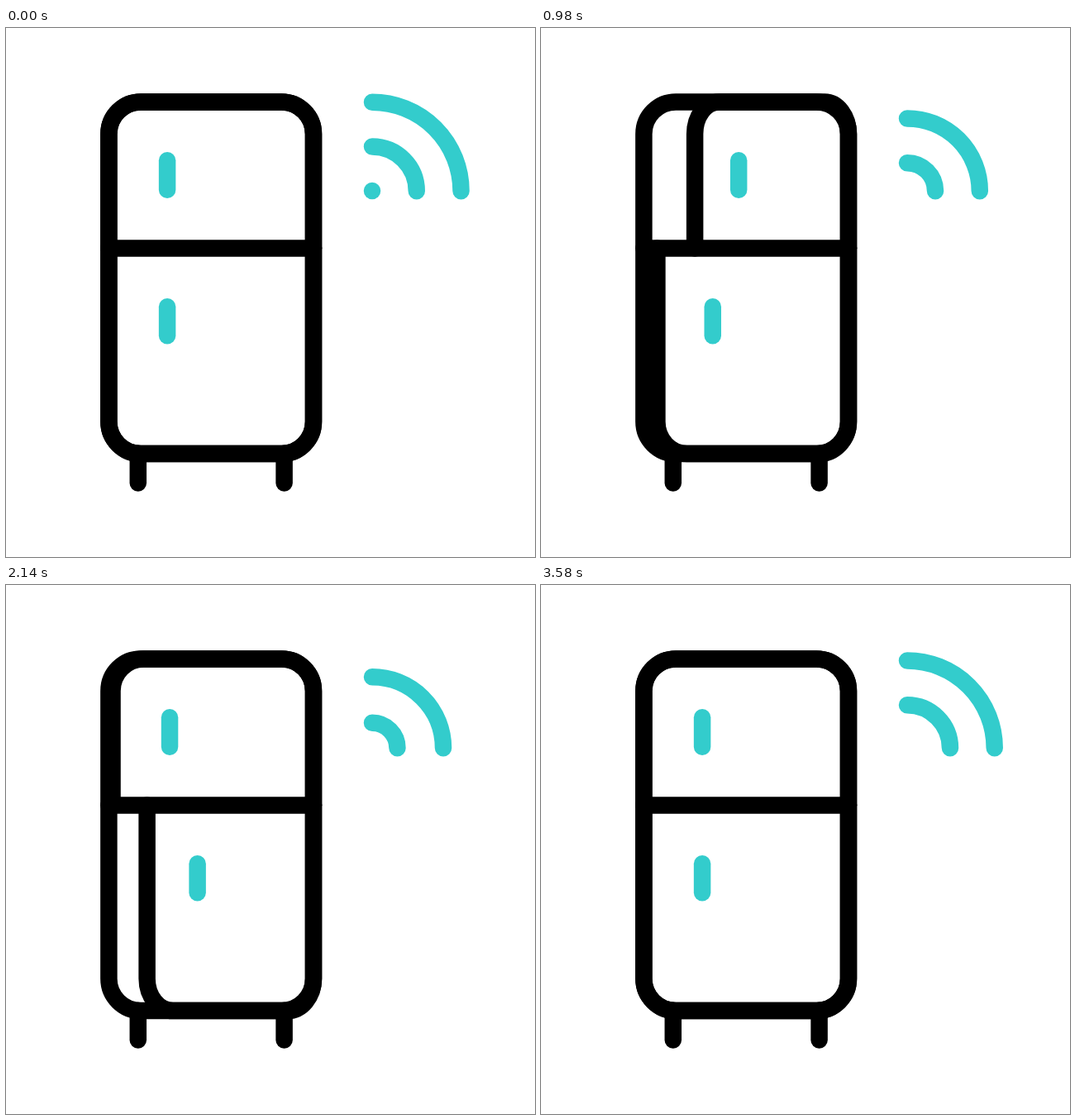
Write an HTML page with a canvas that moves like this. It is 640x640 px and loops after 3600 ms.

```html
<!DOCTYPE html>
<html lang="en">
<head>
<meta charset="utf-8">
<title>Smart fridge</title>
<style>
  html, body { margin: 0; width: 100%; height: 100%; overflow: hidden; background: #fff; }
  canvas { display: block; width: 640px; height: 640px; }
</style>
</head>
<body>
<canvas id="stage" width="640" height="640"></canvas>
<script>
const ctx = document.getElementById('stage').getContext('2d');
const LOOP = 3600, STEP = 20;
const BLACK = '#000', TEAL = '#33cccc';
const LEFT = 124.4, RIGHT = 372, TOP = 89.5, MIDDLE = 266.5, BOTTOM = 515, RADIUS = 38.7;
const SWING = 66;
const SPEED = 0.0896, CARRY_SPEED = 0.0863, MAX_REACH = 119.8;
const WAVE_STARTS = [0, 600, 1180, 1800, 2400, 3000];

const UPPER = { open: [60, 1180], close: [1200, 2340], edge: TOP, handle: [160.3, 195.7], follow: 0.714 };
const LOWER = { open: [605, 1705], close: [1715, 2835], edge: BOTTOM, handle: [337.3, 372.3], follow: 0.79 };

// Ease-in-out, cubic-bezier(.42, 0, .58, 1)
function ease(x) {
  if (x <= 0) return 0;
  if (x >= 1) return 1;
  let lo = 0, hi = 1;
  for (let i = 0; i < 24; i++) {
    const u = (lo + hi) / 2, v = 1 - u;
    if (1.26 * u * v * v + 1.74 * u * u * v + u * u * u < x) lo = u;
    else hi = u;
  }
  return lo * lo * (3 - 2 * lo);
}

const progress = (t, [start, end]) => ease((t - start) / (end - start));

function stroke(color, build) {
  ctx.strokeStyle = color;
  ctx.beginPath();
  build();
  ctx.stroke();
}

function line(color, x1, y1, x2, y2) {
  stroke(color, () => {
    ctx.moveTo(x1, y1);
    ctx.lineTo(x2, y2);
  });
}

function drawBody() {
  stroke(BLACK, () => ctx.roundRect(LEFT, TOP, RIGHT - LEFT, BOTTOM - TOP, RADIUS));
  line(BLACK, LEFT, MIDDLE, RIGHT, MIDDLE);
  for (const x of [159.8, 336.6]) line(BLACK, x, BOTTOM, x, 550.4);
}

function drawDoor(door, t) {
  const shift = SWING * (progress(t, door.open) - progress(t, door.close));
  const left = LEFT + shift;
  const rx = RADIUS * (RIGHT - left) / (RIGHT - LEFT);
  const isTop = door.edge === TOP;
  const cy = door.edge + (isTop ? RADIUS : -RADIUS);
  const turn = isTop ? -Math.PI / 2 : Math.PI / 2;
  stroke(BLACK, () => {
    ctx.moveTo(left, MIDDLE);
    ctx.ellipse(left + rx, cy, rx, RADIUS, 0, Math.PI, turn, !isTop);
    ctx.ellipse(RIGHT - rx, cy, rx, RADIUS, 0, turn, 0, !isTop);
    ctx.lineTo(RIGHT, MIDDLE);
  });
  const x = 195.1 + shift * door.follow;
  line(TEAL, x, door.handle[0], x, door.handle[1]);
}

function drawWave(start, t) {
  const r = t >= start
    ? (t - start) * SPEED
    : (LOOP - start) * SPEED + t * CARRY_SPEED;
  if (r > MAX_REACH) return;
  if (r === 0) line(TEAL, 443, 197, 443.01, 197);
  else stroke(TEAL, () => ctx.arc(443, 197.2, r, -Math.PI / 2, 0));
}

function draw(t) {
  ctx.fillStyle = '#fff';
  ctx.fillRect(0, 0, 640, 640);
  ctx.lineWidth = 20.5;
  ctx.lineCap = ctx.lineJoin = 'round';
  drawBody();
  drawDoor(UPPER, t);
  drawDoor(LOWER, t);
  for (const start of WAVE_STARTS) drawWave(start, t);
}

function tick() {
  draw(Math.floor(performance.now() % LOOP / STEP) * STEP);
  requestAnimationFrame(tick);
}
tick();
</script>
</body>
</html>
```
